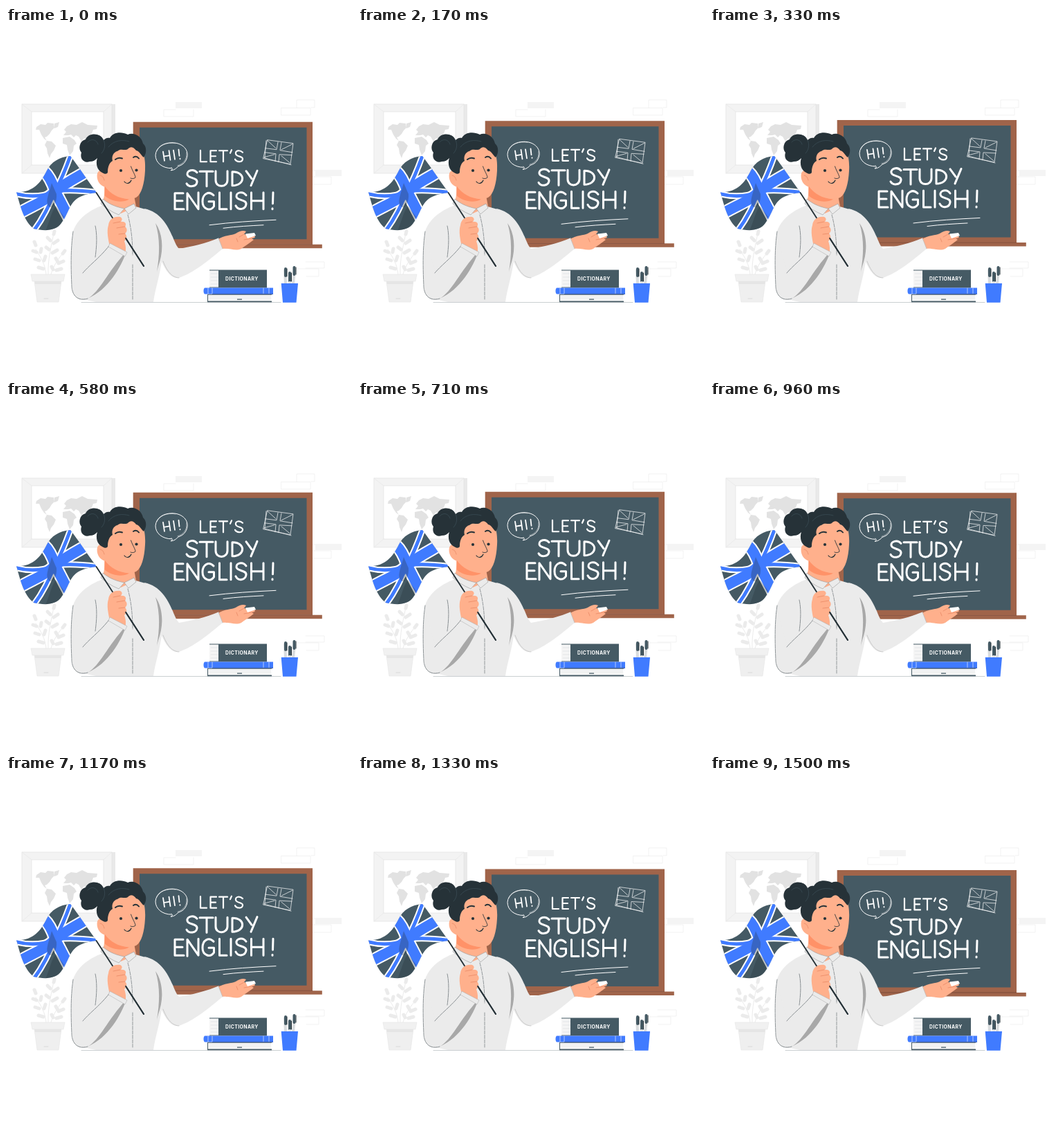
Animation, 500 px wide and 500 px high, one loop 1.54 s. Source, as an HTML page:

```html
<!DOCTYPE html>
<html lang="en">
<head>
<meta charset="utf-8">
<title>Let's study English</title>
<style>
html, body { margin: 0; width: 100%; height: 100%; overflow: hidden; background: #fff; }
svg { display: block; width: 100vw; height: 100vh; }
.line { fill: none; stroke-linecap: round; stroke-linejoin: round; }
.ink { stroke: #263238; }
.chalk { stroke: #fff; }
.skin { fill: #ffb08c; }
.fold { stroke: #e98a66; stroke-width: .8; }
</style>
</head>
<body>
<svg viewBox="0 0 500 500">
  <defs>
    <clipPath id="cloth">
      <path d="M93 185C77 186 65 194 59 206C50 224 39 238 15 237C21 259 26 279 40 290C57 294 72 293 80 282C91 268 91 252 107 244C115 240 123 239 131 238C119 222 107 203 93 185Z"/>
    </clipPath>
    <path id="saltire" d="M94 182C87 202 80 219 71 236C63 254 55 273 40 293M135 238C113 235 93 233 71 236C55 243 37 246 12 239"/>
    <path id="cross" d="M114 209C100 217 86 224 71 236C60 248 44 254 22 266M54 206C64 215 68 226 71 236C77 247 82 258 91 274"/>
  </defs>

  <!-- wall -->
  <path fill="#f4f4f4" d="M245 107H283V116H245ZM447 205H485V214H447Z"/>
  <path class="line" stroke="#ececec" stroke-width=".7" d="M245 118H228V128H271V118M398 115.500H440V126H398ZM420 115V104H446V115H441M443 215H470V226H443M443 206H447M433 338H460V347H433M420 348H452V359H434"/>

  <!-- map picture -->
  <path fill="#e9e9e9" d="M23 110H158V210H23Z"/>
  <path fill="#f3f3f3" stroke="#e4e4e4" stroke-width=".8" d="M23 110H153V210H23Z"/>
  <path fill="#fff" stroke="#e4e4e4" stroke-width=".8" d="M37 121H141V198H37Z"/>
  <path class="line" stroke="#e4e4e4" stroke-width=".6" d="M23 110L37 121M153 110L141 121M23 210L37 198M153 210L141 198"/>
  <g fill="#e2e2e2">
    <path d="M44 143L50 139L57 140L60 137L69 138L70 144L66 148L63 153L59 157L56 158L59 163L55 160L51 154L48 147L43 147Z"/>
    <path d="M59 163L66 164L72 170L69 177L65 182L63 188L60 181L59 174L56 169Z"/>
    <path d="M70 138L77 136L75 143L70 145Z"/>
    <path d="M83 155L87 150L84 147L88 142L94 139L102 140L110 136L118 140L132 141L131 146L126 147L123 155L119 158L117 164L113 159L109 164L105 157L101 155L98 158L94 154L90 155Z"/>
    <path d="M82 159L92 157L99 162L102 167L98 170L97 178L92 184L89 176L88 169L82 167Z"/>
    <path d="M116 176L122 172L128 177L127 183L121 182L116 183ZM113 165L122 167L127 171L118 169Z"/>
  </g>

  <!-- plant -->
  <g class="line" stroke="#ebebeb">
    <path d="M58 356C57 342 50 331 43 320M61 356C60 334 66 314 69 296M65 356C68 344 76 333 84 323"/>
    <path stroke-width="5" d="M41 309L43 314M39 322L44 324M51 319L50 324M42 334L48 336M57 330L55 336M47 346L54 348M70 294L69 298M60 303L64 307M75 307L69 311M58 317L62 320M74 321L67 325M85 322L82 326M72 333L75 338M83 337L76 340M66 345L68 349M80 348L73 350"/>
  </g>
  <path fill="#efefef" stroke="#e4e4e4" stroke-width=".6" d="M41 366H80L76 396H45Z"/>
  <path fill="#e5e5e5" d="M41 366H80L79 370H42Z"/>
  <path fill="#f1f1f1" stroke="#e4e4e4" stroke-width=".6" d="M36 356H85L83 366H38Z"/>
  <path class="line" stroke="#d9d9d9" d="M55 391H61"/>

  <path class="line" stroke="#b4babd" stroke-width=".7" d="M109 396.500H397"/>

  <!-- blackboard -->
  <g id="board">
    <path fill="#a0644a" d="M183.700 136H443V313H183.700Z"/>
    <path fill="#455a64" d="M193 144H434.500V305.500H193Z"/>
    <path fill="#a0644a" d="M183.700 313H456.800V318.500H183.700Z"/>
    <path fill="#7f4b38" d="M183.700 312.700H443V313.500H183.700Z"/>
    <g class="line chalk" stroke-width="1">
      <path d="M239 203C226 203 216 195 216 184C217 172 228 166 240 166C253 166 263 174 262 185C261 193 256 198 249 200C246 203 243 206 238 206C241 205 241 203 239 202"/>
      <path stroke-width=".5" d="M218 178C222 169 233 165 245 167M261 180C262 190 256 197 248 199"/>
      <path d="M294 285C325 281 358 279 390 277.500M314 289.500C334 287 353 286 372 285"/>
      <g stroke-width=".7">
        <path d="M378 162L415 167L411 197L372 189ZM376 163L374 188M373 188L412 198"/>
        <path d="M393 165L391 176L375 174M398 166L396 177L414 180M374 180L390 182L389 193M413 184L395 183L394 194"/>
        <path d="M378 163L390 174M414 168L398 176M373 187L388 183M410 195L398 185"/>
      </g>
    </g>
    <g class="line chalk" role="img" aria-label="Hi! Let's study English!">
      <path stroke-width="1.800" d="M227 179L229 192M235.500 177.500L237.500 191M228 186L236.500 184.500M242 177L244 190M249.500 176L250.500 185M251.500 189V189.500"/>
      <path stroke-width="2.200" d="M281 177V193.500H290M304 177.500H295.500V193.500H304M295.500 185.500H303M308 177.500H320M314 177.500V193.500M326 176.500L324 181M342 180C338 176 331 177 332 182S343 185 342 190S333 194 331 190"/>
      <path stroke-width="3" d="M276 209C271 203 261 206 262 212S277 216 276 223S264 231 261 225M280 207.500H299M290 208V229M303 207V220C303 232 320 231 320 220V207M327 208V228C346 228 347 208 327 208M347 207L355 218M363 206.500L354 228"/>
      <path stroke-width="3" d="M256 239H244V262H257M244 250H255M262 263V239L278 262V238M300 242C293 235 284 240 284 251S295 266 300.500 258V251H293M308.500 238V262H319M325 238V262M347 242C342 235 332 238 333 244S348 248 347 255S336 265 332 257M354.500 238V262M372 238V262M354.500 250H372M386 238L385.500 254M385 261V262"/>
    </g>
  </g>

  <!-- far arm and hand -->
  <path class="skin" d="M305 306C316 299 326 300 332 297C338 293 343 292 347 294L344 298L357 300C362 301 360 304 355 304L358 306C352 311 345 315 340 319C332 323 324 318 312 319Z"/>
  <path fill="#fff" d="M346 297.500L359 296L361 300L349 304Z"/>
  <path class="line fold" d="M344 298L337 302M355 304L344 306M333 304L335 309"/>
  <path fill="#ebebeb" d="M200 261C223 266 233 284 241 302C244 310 247 316 250 319C269 316 289 311 307 303.500L313 319C294 335 271 354 250 361C237 363 229 348 221 329Z"/>
  <path class="line" stroke="#b0b0b0" stroke-width=".6" d="M227 337C233 353 241 361 250 361M307 303.500L313 319"/>

  <!-- neck and torso -->
  <path fill="#ebebeb" d="M143 255C122 262 103 275 97 294C93 320 94 346 95 372C96 388 103 394 116 393L130 396H213C216 373 226 349 226 320C225 290 222 272 205 263L184 257Z"/>
  <path fill="#a8a8a8" d="M216 282C226 296 228 318 222 338C220 344 219 348 218 352C222 329 223 304 216 282Z"/>
  <path class="skin" d="M142 215C142 235 143 244 140 249L166 268L188 258L185 242Z"/>
  <path fill="#ebebeb" stroke="#999" stroke-width=".6" stroke-linejoin="round" d="M140 247C147 253 156 258 171 261L163 270C153 266 144 260 137 254ZM171 261L185 254L188 260L177 269Z"/>
  <path class="line ink" stroke-width=".45" stroke-dasharray="5 1.500" d="M183 342V392M176 270C181 288 183 309 183 328"/>

  <!-- head -->
  <path class="skin" d="M146 187C155 174 174 164 188 169C199 173 202 190 201 206C200 225 196 240 188 245C176 250 155 244 144 230C135 228 130 219 132 210C134 204 141 204 146 208Z"/>
  <path fill="#ff9268" d="M143 229C151 240 162 246 178 247.500C167 254 150 250 142.500 242Z"/>
  <path class="line fold" d="M136 213C139 213 141 216 142 220"/>
  <path fill="#263238" d="M141 162C137 151 119 151 115 161C106 163 104 175 109 180C106 189 113 196 121 193C126 193 129 191 132 188C129 196 132 206 139 209C143 212 147 211 147 208C147 200 150 194 154 192C152 185 156 179 161 178C166 173 172 178 176 175C181 169 186 174 188 177C193 178 195 184 199 187C204 180 203 171 198 167C196 156 184 150 176 154C166 149 154 151 150 159C147 158 144 159 141 162Z"/>
  <path class="line" stroke="#455a64" stroke-width=".5" d="M141 162C144 168 143 176 138 181M118 165C123 159 131 161 133 168M148 172C156 162 168 161 178 164"/>
  <circle cx="166" cy="206" r="2.100" fill="#263238"/>
  <circle cx="188.500" cy="205.500" r="2.100" fill="#263238"/>
  <path class="line ink" stroke-width="2" d="M158 190C161 187.500 164 187 168 188.500M184 187C187 185 190 186 192 188.500"/>
  <path class="line ink" stroke-width="1.200" d="M171 222C174 226 179 225 181 220"/>
  <path class="line ink" stroke-width=".9" d="M180.500 200C183 207 187 213 187 216C185 218 182 218 180 217"/>

  <!-- flag -->
  <g clip-path="url(#cloth)">
    <path fill="#455a64" d="M10 180H135V296H10Z"/>
    <g class="line" stroke="#fff">
      <use href="#saltire" stroke-width="9"/>
      <use href="#cross" stroke-width="19"/>
    </g>
    <g class="line" stroke="#407bff">
      <use href="#saltire" stroke-width="5"/>
      <use href="#cross" stroke-width="15"/>
    </g>
    <path fill="#263238" opacity=".3" d="M66 224C62 240 56 251 62 258C67 263 74 253 73 240ZM72 257C65 267 63 280 57 293H74L84 273Z"/>
  </g>
  <path class="line ink" stroke-width="1.900" d="M130.500 238L199 344"/>

  <!-- near arm and hand -->
  <path fill="#ebebeb" d="M98 304C96 335 94 365 97 381C102 394 115 393 124 389C143 370 162 346 176 322L151 312C137 329 124 341 112 353Z"/>
  <path fill="#a8a8a8" d="M174 323C166 346 148 378 118 391C136 381 146 353 174 323Z"/>
  <path class="line ink" stroke-width=".5" stroke-dasharray="6 1" d="M97 294C93 320 94 350 95 374C96 388 105 395 118 391M151 312C137 331 122 341 111 354M129 286C132 300 131 316 129 331"/>
  <path class="skin" d="M150 316C148 306 145 294 148 285C149 277 155 272 165 273C169 275 168 279 165 280C172 279 175 283 172 287C176 290 175 295 172 297C176 301 174 306 171 308C173 314 174 320 172 327Z"/>
  <path class="line fold" d="M165 280L155 282M172 287L160 289M172 297L163 298"/>
  <path fill="#ebebeb" stroke="#aaa" stroke-width=".5" d="M150 311L175 324L172 330L148 316Z"/>
  <path class="line ink" stroke-width="1.900" d="M173 303.800L199 344"/>

  <!-- books -->
  <path fill="#f5f5f5" d="M294 350H307V375H294Z"/>
  <path class="line" stroke="#c8cdcf" stroke-width=".4" d="M296 355H307M296 360H307M296 365H307M296 370H307"/>
  <path fill="#455a64" d="M294 349.500H377V375.500H294V374.500H307V350.500H294Z"/>
  <text x="317" y="365.300" fill="#fff" font-family="Inter, Roboto, sans-serif" font-size="6.900" font-weight="700" letter-spacing=".4">DICTIONARY</text>
  <path fill="#407bff" d="M287 375.500H386V384.500H287C285 383 285 377 287 375.500Z"/>
  <path class="line" stroke="#fff" stroke-width=".6" d="M292 376V384M298 376V384M372 376V384M380 376V384"/>
  <path fill="#2d56b5" d="M298 383.700H386V384.700H298Z"/>
  <path fill="#f7f7f7" d="M292 385.500H383V394.500H292Z"/>
  <path class="line" stroke="#d0d4d6" stroke-width=".4" d="M293 388.500H383M293 391H383"/>
  <path fill="#455a64" d="M291 384.700H384V385.700H292V394.500H384V396.300H291ZM334 391.500H341V392.700H334Z"/>

  <!-- pen cup -->
  <g class="line">
    <path stroke="#d9dcde" stroke-width="4" d="M403 350L404 370M417 350L415 370"/>
    <path stroke="#455a64" stroke-width="4" d="M404 348V358M416.500 346V356M410 354V366"/>
    <path class="ink" stroke-width="1" d="M406 348V359M419 346V356M412.500 354V366"/>
    <path stroke="#e8e8e8" stroke-width="4" d="M410 368V371"/>
  </g>
  <path fill="#407bff" d="M397.700 369H422L419.500 396.700H400Z"/>
</svg>
<script>
const LOOP = 1540, LEAD = 30, LIFT = 6.5;
const board = document.getElementById('board');

function draw(now) {
  const phase = ((now + LEAD) % LOOP) / LOOP;
  const rise = LIFT * (1 - Math.abs(2 * phase - 1));
  board.setAttribute('transform', `translate(0 ${-rise})`);
  requestAnimationFrame(draw);
}
draw(0);
</script>
</body>
</html>
```
